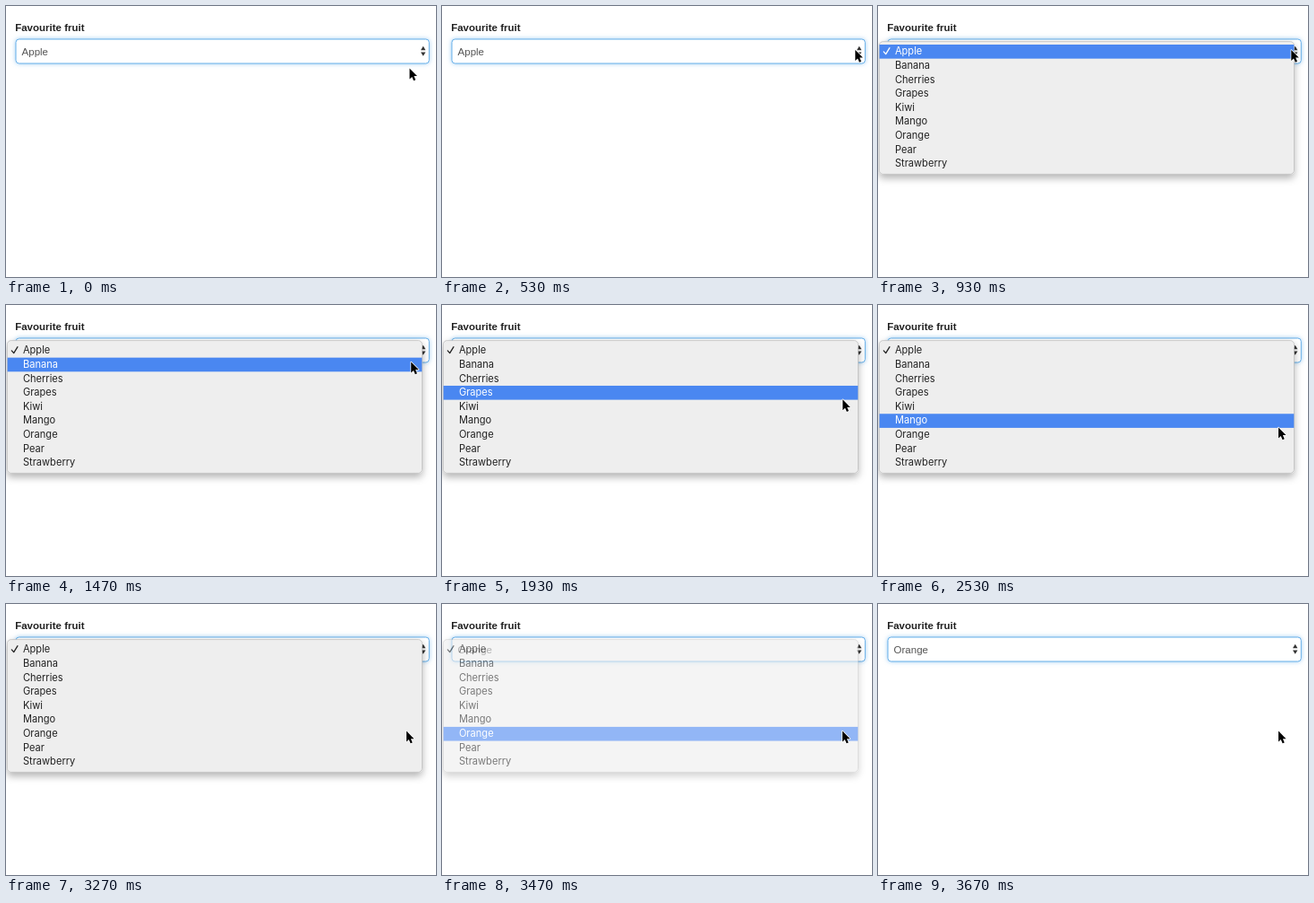
An HTML page that plays this animation: 480x302 px, repeating every 3990 ms.

```html
<!DOCTYPE html>
<html lang="en">
<head>
<meta charset="utf-8">
<title>Favourite fruit</title>
<style>
  html, body { margin: 0; width: 100%; height: 100%; overflow: hidden; background: #fff; }
  svg { display: block; width: 100%; height: 100%; }
  .form { font-family: "Liberation Sans", Arial, sans-serif; font-size: 11.5px; }
  .label { font-weight: bold; fill: #222; }
  .value { fill: #555; }
  .menu { font-family: Inter, sans-serif; font-size: 11.1px; }
</style>
</head>
<body>
<svg viewBox="0 0 480 302" xmlns="http://www.w3.org/2000/svg">
  <defs>
    <filter id="glow" filterUnits="userSpaceOnUse" x="0" y="24" width="480" height="56">
      <feDropShadow dx="0" dy="0" stdDeviation="2.6" flood-color="#66afe9" flood-opacity=".6"/>
    </filter>
    <filter id="shadow" filterUnits="userSpaceOnUse" x="-20" y="20" width="510" height="200">
      <feDropShadow dx="0" dy="4" stdDeviation="4" flood-color="#000" flood-opacity=".3"/>
    </filter>
  </defs>
  <g class="form">
    <text class="label" x="10.2" y="28">Favourite fruit</text>
    <rect x="11" y="37" width="461.3" height="27" rx="3.6" fill="#fff" stroke="#66afe9" filter="url(#glow)"/>
    <text class="value" id="value" x="17.6" y="54.5"></text>
    <path d="M463 49.2 L465.7 44.8 L468.4 49.2 Z M463 51.4 L465.7 55.8 L468.4 51.4 Z" fill="#333"/>
  </g>
  <g class="menu" id="menu">
    <rect x="1.4" y="39.6" width="463.1" height="147.8" rx="4.2" fill="#eee" stroke="#b8b8b8" stroke-width=".7" filter="url(#shadow)"/>
    <rect id="highlight" x="1.6" width="462.7" fill="#4a87f1"/>
    <path id="check" d="M6.3 50.9 L8.7 53.6 L13 46.7" fill="none" stroke-width="1.3" stroke-linecap="round" stroke-linejoin="round"/>
    <g id="items"></g>
  </g>
  <path id="cursor" d="M0 0 V11.9 L2.7 9.4 L4.6 13.7 L6.7 12.8 L4.9 8.6 H8.5 Z"
        fill="#000" stroke="#fff" stroke-width="1.4" stroke-linejoin="round" paint-order="stroke"/>
</svg>
<script>
const LOOP = 3990, FPS = 15;
const ROW_TOP = 43, ROW_HEIGHT = 15.65;
const OPEN = 11, BLINK = 49, FADE = 51, CLOSED = 55;
const fruits = ["Apple", "Banana", "Cherries", "Grapes", "Kiwi", "Mango", "Orange", "Pear", "Strawberry"];

// Pointer path: [tick, x, y]
const path = [
  [0, 450.5, 69.5], [3, 455.5, 61], [6, 460, 52], [8, 461.3, 49], [19, 461.3, 49],
  [22, 452.2, 63.5], [27, 448, 90.3], [29, 447.3, 105.3],
  [35, 447, 129], [38, 447, 136.5], [42, 447, 141.6]
];

const el = id => document.getElementById(id);
const [value, menu, highlight, check, items, cursor] =
  ["value", "menu", "highlight", "check", "items", "cursor"].map(el);

const rows = fruits.map((name, i) => {
  const text = document.createElementNS("http://www.w3.org/2000/svg", "text");
  text.setAttribute("x", 18.9);
  text.setAttribute("y", ROW_TOP + ROW_HEIGHT * i + 11.2);
  text.textContent = name;
  return items.appendChild(text);
});
highlight.setAttribute("height", ROW_HEIGHT);

function pointerAt(tick) {
  const next = path.findIndex(p => p[0] > tick);
  if (next < 0) return path[path.length - 1].slice(1);
  const [a, b] = [path[next - 1], path[next]];
  const u = (tick - a[0]) / (b[0] - a[0]);
  return [1, 2].map(i => a[i] + (b[i] - a[i]) * u);
}

function menuOpacity(tick) {
  if (tick < OPEN || tick >= CLOSED) return 0;
  return Math.min(1, (CLOSED - tick) / (CLOSED - FADE + 1));
}

function render(time) {
  const tick = Math.floor((time + 4) * FPS / 1000);
  const [x, y] = pointerAt(tick);
  const active = tick === BLINK ? -1 : Math.floor((y - ROW_TOP) / ROW_HEIGHT);

  cursor.setAttribute("transform", `translate(${x} ${y})`);
  value.textContent = tick < FADE ? "Apple" : "Orange";
  menu.setAttribute("opacity", menuOpacity(tick));
  highlight.setAttribute("y", ROW_TOP + ROW_HEIGHT * active);
  highlight.setAttribute("visibility", active < 0 ? "hidden" : "visible");
  rows.forEach((row, i) => row.setAttribute("fill", i === active ? "#fff" : "#222"));
  check.setAttribute("stroke", active === 0 ? "#fff" : "#222");
}

const start = performance.now();
function loop() {
  render((performance.now() - start) % LOOP);
  requestAnimationFrame(loop);
}
loop();
</script>
</body>
</html>
```
